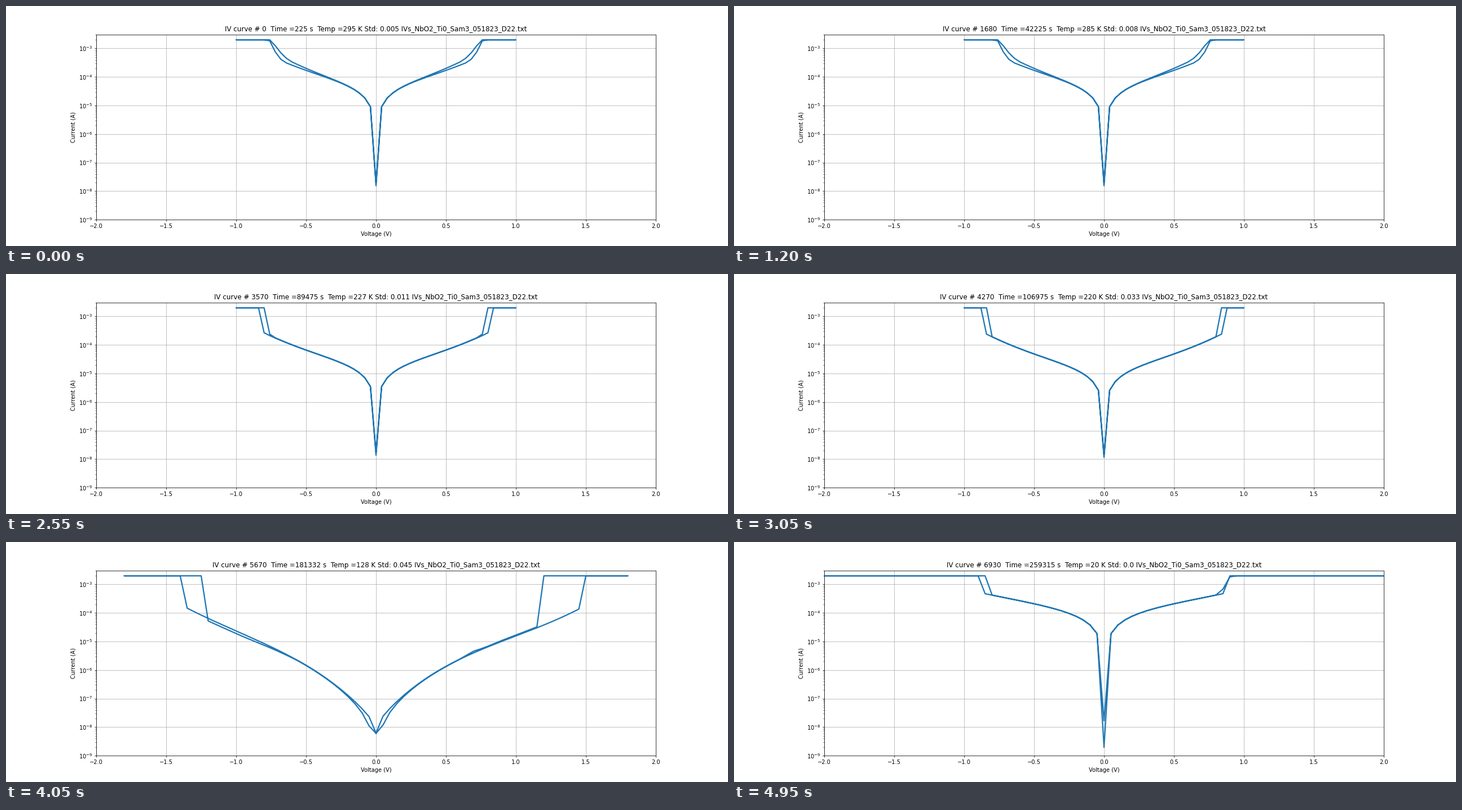
A matplotlib script that plays this animation: 1280 px wide and 427 px high, repeating every 5 s.

```python
import matplotlib.pyplot as plt
import numpy as np
from matplotlib.animation import FuncAnimation

DPI = 640 / 9
W, H = 1280, 427
FRAMES = 100
CURVES_PER_FRAME = 70
CAP = np.log10(2e-3)      # compliance current, in decades
OFFSET = 6.1e-9           # leakage offset in amperes
COOLING, MIXED, COLD, BROKEN = 24.5, 71, 90, 95


def warm(v, log_g, bend, knee, log_k):
    """Ohmic current in decades, bending up, with runaway past the knee."""
    runaway = 10 ** log_k * np.maximum(v - knee, 0) ** 2
    return np.log10(np.maximum(v, 1e-6)) + log_g + bend * v ** 2.5 + runaway


def warm_state(i):
    """Conductance, current at 0 V and the out and back legs' shapes."""
    d = max(i - COOLING, 0)
    log_g = -3.645 - .017 * d + 5.5e-5 * d ** 2
    zero = -7.8 - 2.6e-6 * d ** 3
    out = (1, .645 + .0057 * d, 1.6 + .041 * d)
    back = (1 + .4 * np.exp(-d / 9), .598 + .0057 * d, 1.25 + .049 * d)
    return log_g, zero, out, back


def cold(v, level, slope, cubic):
    u = v - 1.4
    return level + slope * u + cubic * u ** 3


def grid(v_max, step):
    return np.arange(round(v_max / step) + 1) * step


def join(v, legs, zeros=None):
    """Chain 0 > +max > 0 > -max > 0 into one trace."""
    x = np.concatenate([v, v[::-1], -v, -v[::-1]])
    y = np.concatenate([legs[0], legs[1][::-1], legs[2], legs[3][::-1]])
    if zeros:
        n = len(v)
        y[[0, 2 * n - 1, 2 * n, 4 * n - 1]] = np.take(zeros, [0, 1, 1, 2])
    return x, np.minimum(y, CAP)


def warm_trace(i):
    log_g, zero, out, back = warm_state(i)
    v = grid(1, .04)
    legs = [warm(v, log_g, *out), warm(v, log_g, *back)] * 2
    return join(v, legs, (zero, zero + .06, zero))


def mixed_trace():
    """Several sweeps in one trace, cut short where the range changes."""
    log_g, zero, out, back = warm_state(MIXED)
    floor, step = -6.3, 1 / 60
    v = grid(1, step)
    xs, ys = [], []
    for j, spread in enumerate(np.linspace(-.07, .07, 5)):
        shift = np.array([0, step * (j % 2), 0])
        legs = [warm(v, log_g + spread, *(out + shift)),
                warm(v, log_g + spread, *(back + shift))] * 2
        start = zero if j == 0 else floor
        x, y = join(v, legs, (start, start, floor))
        xs.append(x)
        ys.append(y)
    v = grid(1.2, step)
    last = np.minimum(warm(v, log_g + .03, *back), CAP)
    last[0] = floor
    tail = v[::-1] >= .75 - 1e-6
    xs += [-v, -v[::-1][tail], [1.2, 0]]
    ys += [last, last[::-1][tail], [CAP, zero]]
    return np.concatenate(xs), np.concatenate(ys)


def cold_trace(i):
    w = min((i - MIXED) / (COLD - MIXED), 1)
    v_max = 1.2 if i < 75 else 1.5 if i < 81 else 1.8 if i < 89 else 2
    v = grid(v_max, .05)
    log_g = warm_state(MIXED)[0]
    legs = []
    # Cold shape, final thresholds out and back, drift and bump of the way back.
    for shape, end_out, end_back, drift, bump in [
            ((-5.21, 1.85, .76), 1.95, 1.45, .06, .09),
            ((-4.84, 2.22, .73), 1.75, 1.50, -.17, 0)]:
        th_out = min(.933 + w * (end_out - .933), v_max - .05)
        th_back = .88 + w * (end_back - .88)
        u = v * end_out / th_out
        log_i = ((1 - w) * warm(v * .92 / th_out, log_g, 1, 9, 0)
                 + w * cold(u, *shape))
        change = (drift * np.clip((u - .7) / .5, 0, 1)
                  + bump * np.exp(-((u - .92) / .07) ** 2))
        out = np.log10(10 ** log_i + OFFSET)
        back = np.log10(np.abs(10 ** (log_i + w * change) - OFFSET) + 1e-12)
        legs.append(np.where(v >= th_out - 1e-6, CAP, out))
        legs.append(np.where(v >= th_back - 1e-6, CAP, back))
    return join(v, legs)


def broken_trace():
    v = grid(2, .05)
    shapes = [(.85, 3), (.79, 1.65), (.85, 3), (.8, 3)]
    legs = [warm(v, -3.422, .25, *shape) for shape in shapes]
    return join(v, legs, (-8.7, -7.78, -8.7))


def trace(i):
    if i < MIXED:
        return warm_trace(i)
    if i == MIXED:
        return mixed_trace()
    return cold_trace(i) if i < BROKEN else broken_trace()


def title(i):
    n = i * CURVES_PER_FRAME
    if i < MIXED:
        time = 225 + 25 * n
    else:
        time = np.interp(i, [MIXED, COLD, 99], [129679, 227819, 259315])
    temp = np.interp(i, [0, 24, 38, 51, MIXED, COLD, 99],
                     [295, 285, 257, 227, 213, 52, 20])
    std = np.interp(i, [0, 24, 38, 51, MIXED, COLD],
                    [.005, .008, .01, .011, .054, .036])
    std = round(float(std), 3) if i < BROKEN else 0.0
    return (f"IV curve # {n}  Time ={round(time)} s  Temp ={round(temp)} K "
            f"Std: {std} IVs_NbO2_Ti0_Sam3_051823_D22.txt")


# The small margin keeps the pixel size from rounding down.
fig, ax = plt.subplots(figsize=((W + .001) / DPI, (H + .001) / DPI), dpi=DPI)
ax.set_yscale("log")
ax.set_xlim(-2, 2)
ax.set_ylim(1e-9, 3e-3)
ax.set_xlabel("Voltage (V)")
ax.set_ylabel("Current (A)")
ax.grid(True)
line, = ax.plot([], [], color="tab:blue", lw=2.3)


def update(i):
    x, y = trace(i)
    line.set_data(x, 10 ** y)
    ax.set_title(title(i))
    return line,


anim = FuncAnimation(fig, update, frames=FRAMES, interval=50,
                     init_func=lambda: update(0), repeat=True, repeat_delay=0)
plt.show()
```
